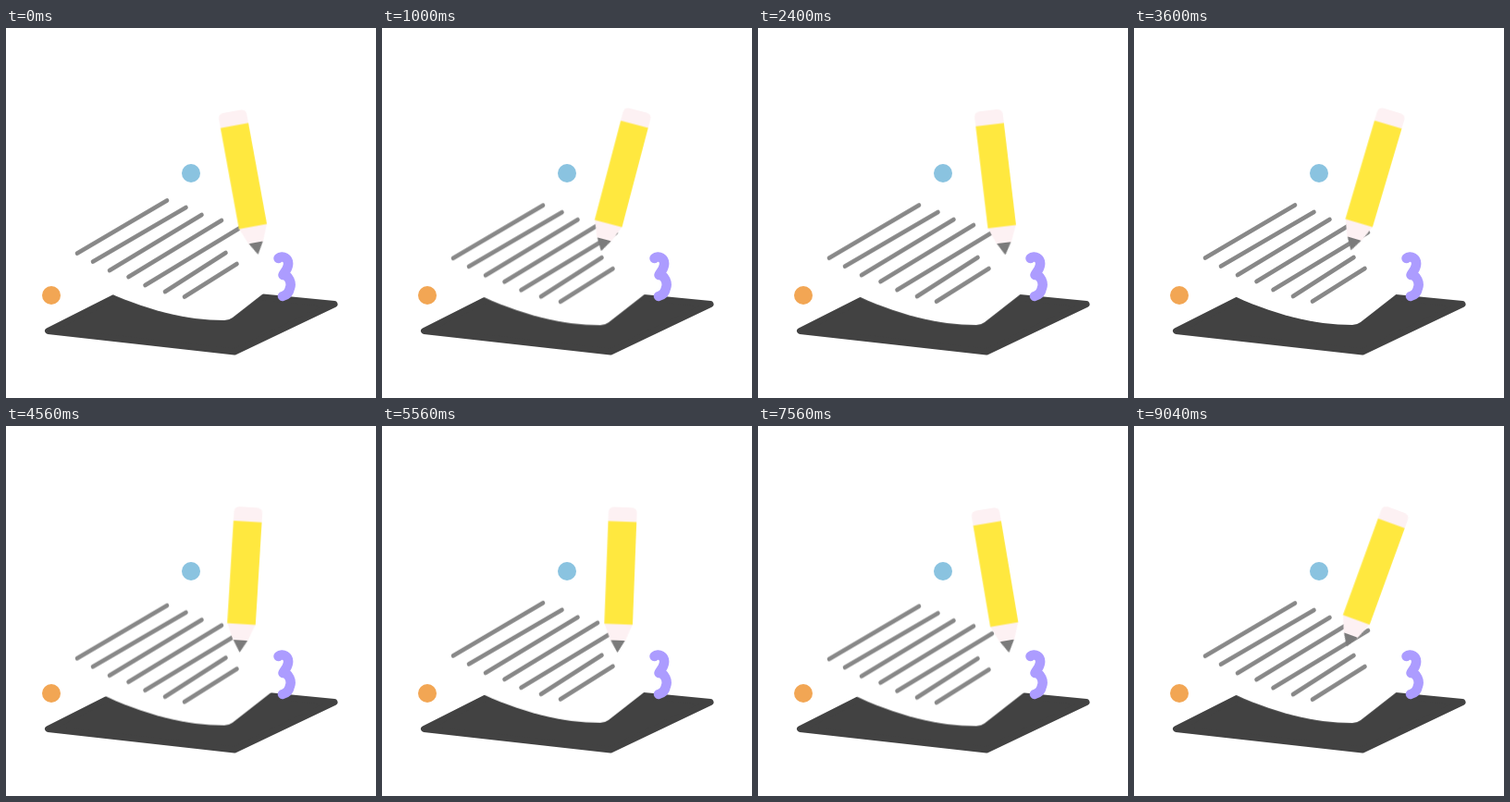
These frames come from a looping animation (400 by 400 pixels, 10 s). An HTML page:

```html
<!DOCTYPE html>
<html lang="en">
<head>
<meta charset="utf-8">
<title>Writing pencil</title>
<style>
  html, body { margin: 0; width: 100%; height: 100%; overflow: hidden; background: #fff; }
  svg { display: block; width: 100%; height: 100%; }

  .paper { animation: float 10s ease-in-out infinite; }
  .pencil { transform-origin: 263px 163px; animation: swing 10s linear infinite; }

  .lines { fill: none; stroke: #888; stroke-width: 4.6; stroke-linecap: round; }
  .squiggle { fill: none; stroke: #ac9cff; stroke-width: 10.5; stroke-linecap: round; stroke-linejoin: round; }
  .base { fill: #424242; stroke: #424242; stroke-width: 7; stroke-linejoin: round; }
  .wood { fill: #fdf1f3; }
  .lead { fill: #7b7b7b; stroke: #7b7b7b; stroke-width: 1; stroke-linejoin: round; }

  @keyframes float {
    0% { transform: translateY(0); animation-timing-function: ease-out; }
    10% { transform: translateY(5.3px); }
    15.6% { transform: translateY(7.6px); }
    24% { transform: translateY(5.1px); }
    36% { transform: translateY(5px); }
    45.6% { transform: translateY(7.6px); }
    55.6% { transform: translateY(4.8px); }
    62.4% { transform: translateY(5px); }
    76.4% { transform: translateY(8.4px); }
    90.4%, 100% { transform: translateY(5.1px); }
  }

  /* Swings left and right every 2.53 s, then rests until the loop restarts. */
  @keyframes swing {
    0%, 25.3%, 50.6%, 75.9% { transform: rotate(-10.4deg); }
    13.3%, 38.6%, 63.9%, 89.2% { transform: rotate(23deg); }
    90.4%, 100% { transform: rotate(20deg); }
  }
</style>
</head>
<body>
<svg viewBox="0 0 400 400">
  <path class="base" d="M45.5 327.5 L247 350 L355 298.5 L143.5 278 Z"/>

  <g class="paper">
    <path fill="#fff" d="M100 281 C150 305 195 316 236 316 Q241 316 245 313 L300 270 L180 150 Z"/>
    <path class="lines" d="M77 243.5 L174 186.5
      M94 252.5 L194.500 194
      M112 262 L211.500 202
      M132.500 269 L233 208
      M150.500 278 L253 216
      M172 285 L237.500 243
      M193 290.500 L249.500 255"/>
  </g>

  <circle cx="200" cy="157" r="10" fill="#8ac3e0"/>
  <circle cx="49" cy="289" r="10" fill="#f2a654"/>

  <g class="pencil">
    <path class="wood" d="M242.300 104 V94 Q242.300 88 248.300 88 H266.900 Q272.900 88 272.900 94 V104 Z"/>
    <path class="wood" d="M242.300 214 H272.900 L265.300 233 H249.900 Z"/>
    <path class="lead" d="M250.600 232.500 H264.600 L257.600 244.500 Z"/>
    <rect x="242.300" y="103.500" width="30.600" height="111" fill="#ffe83f"/>
  </g>

  <path class="squiggle" d="M294.500 249 C299 245 306 249 305 256 C304.500 261 301 264 299.500 267
    C306 267 309 276 307 281 C306 286 303 289 299 290"/>
</svg>
</body>
</html>
```
